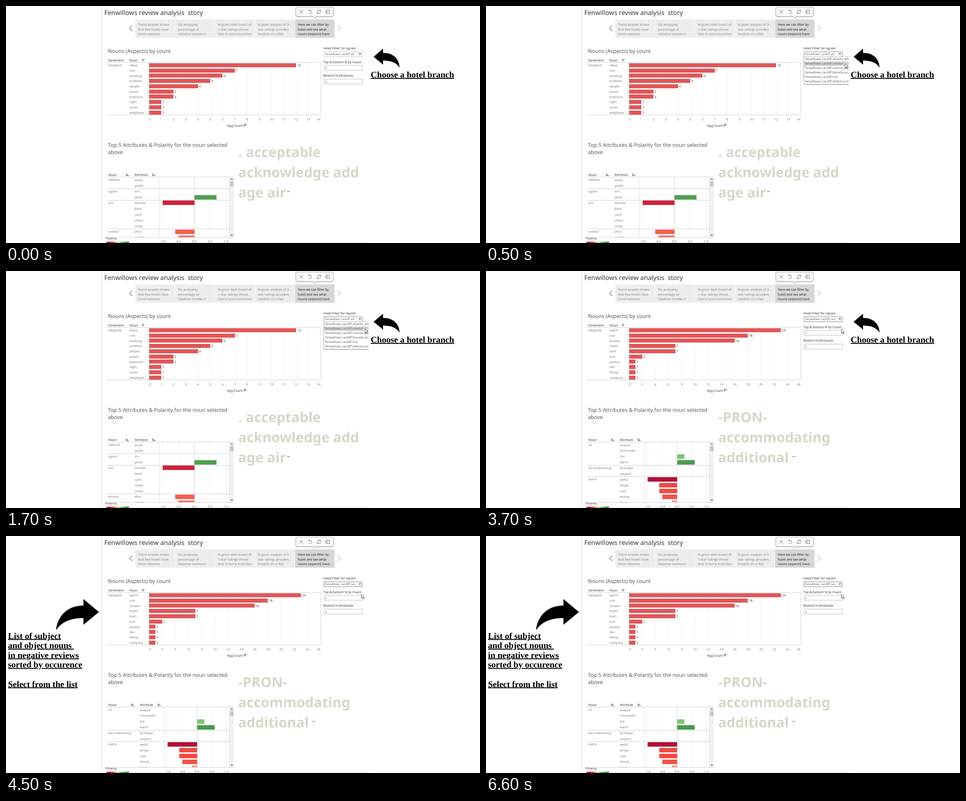
An HTML page that plays this animation: 1056x530 px, repeating every 8 s.

```html
<!DOCTYPE html>
<html lang="en">
<head>
<meta charset="utf-8">
<title>Review story</title>
<style>
html, body { margin: 0; width: 100%; height: 100%; overflow: hidden; background: #fff; }
svg { display: block; }
text { font-family: "Noto Sans", "Open Sans", sans-serif; white-space: pre; text-rendering: geometricPrecision; }
rect, .line { shape-rendering: crispEdges; }
.note { font: bold 19.5px "Liberation Serif", serif; text-decoration: underline; }
</style>
</head>
<body>
<svg id="stage" width="1056" height="530" viewBox="0 0 1056 530"></svg>
<script>
const BRAND = 'Fenwillows', brand = BRAND.toLowerCase();
const GREY = '#7b7b7b', DARK = '#333', RED = '#e15759';

const text = (x, y, s, fill = GREY, size = 7.1, extra = '') =>
  `<text x="${x}" y="${y}" fill="${fill}" font-size="${size}" ${extra}>${s.replace(/&/g, '&amp;')}</text>`;
const rect = (x, y, w, h, fill, stroke = 'none') =>
  `<rect x="${x}" y="${y}" width="${w}" height="${h}" fill="${fill}" stroke="${stroke}"/>`;
const path = (d, stroke, width = 1, fill = 'none') =>
  `<path d="${d}" stroke="${stroke}" stroke-width="${width}" fill="${fill}"/>`;
const line = (d, stroke) => `<path class="line" d="${d}" stroke="${stroke}"/>`;
const hline = (x1, x2, y, c = '#cfcfcf') => line(`M${x1} ${y}H${x2}`, c);
const vline = (x, y1, y2, c = '#f0f0f0') => line(`M${x} ${y1}V${y2}`, c);
const label = (x, y, s) => text(x, y, s, GREY, 7.1, 'text-anchor="middle"');
const sortIcon = (x, y, widths) =>
  widths.map((w, i) => hline(x, x + w, y + 2 * i + .5, '#555')).join('') + vline(x + .5, y, y + 5, '#888');

const counts = [
  { step: 1, max: 14, unit: 27.33, values: [12, 7, 6, 5, 4, 2, 2, 1, 1, 1],
    nouns: 'sleep one booking problem people power bedroom sight route employee' },
  { step: 2, max: 26, unit: 14.72, values: [23, 18, 16, 7, 7, 2, 1, 1, 1, 1],
    nouns: 'alarm one shower towel bath pub worker taxi fitting company' }
];

// rows: attribute, polarity, colour; groups: first row -> noun
const polarity = [
  { col: 341.5, zero: 419.5, unit: 70.7, attrX: 286.5, icons: [267, 326],
    groups: { 0: 'address', 2: 'againi', 4: 'anf', 9: 'animal' },
    rows: [['email'], ['guide'], ['inn'], ['good', .7, '#529f51'], ['terrible', -1, '#d0213b'],
      ['bank'], ['card'], ['check'], ['credit'], ['dirty', -.6, '#f25f4f'], ['wrong', -.5, '#f87664']],
    cloud: ['. acceptable', 'acknowledge add', 'age air'], dots: 627 },
  { col: 353.5, zero: 425.5, unit: 65.3, attrX: 298, icons: [279, 338],
    groups: { 0: 'air', 4: 'airconditioning', 6: 'alarm' },
    rows: [['endure'], ['recirculate'], ['hot', .25, '#7bc772'], ['warm', .6, '#4a9b51'],
      ['drainage'], ['suspect'], ['awful', -1, '#b20f3a'], ['afraid', -.6, '#f04b43'],
      ['cold', -.6, '#f04b43'], ['wrong', -.5, '#f25145'], ['mess', -.18, '#fb9d89']],
    cloud: ['-PRON-', 'accommodating', 'additional'], dots: 683 }
];

const cards = [
  ['Trend anaysis shows', 'that few hotels have', 'mroe negative'],
  ['On analysing', 'percentage of', 'negative reviews it'],
  ['N-gram dash board of', '1-star ratings shows', 'that in some branches'],
  ['N-gram analysis of 2-', 'star ratings provides', 'insights on a few'],
  ['Here we can filter by', 'hotel and see what', 'nouns (aspects) have']
];

function header() {
  let s = vline(212.5, 0, 530, '#dcdcdc') + hline(212, 808, 529.5, '#dcdcdc');
  s += text(219, 19.8, BRAND + ' review analysis  story', '#333', 14.4);
  cards.forEach((lines, i) => {
    const x = 288 + 89 * i, on = i === 4;
    s += rect(x, 30, 88, 41, on ? '#d6d8d5' : '#ebeeeb');
    s += '<g clip-path="url(#cards)">' +
      lines.map((l, j) => text(x + 6, 44 + 10.6 * j, l, on ? '#222' : '#858585', 7.2)).join('') + '</g>';
  });
  s += path('M281.5 44L275 50L281.5 56', '#a6a6a6', 2) + path('M739 44L745.5 50L739 56', '#d4d4d4', 2);
  // toolbar
  s += '<g filter="drop-shadow(0 1px 1px #0004)">' +
    '<path d="M648 2.5H727Q729 2.5 729 4.5V21Q729 23 727 23H692L688 27L684 23H648Q646 23 646 21V4.5Q646 2.5 648 2.5Z" fill="#fff" stroke="#aaa"/></g>';
  s += path('M654 9L662 17M662 9L654 17', '#666');
  s += path('M674.5 10H678A3.5 3.5 0 1 1 674.5 15M676.5 7.5L674 10L676.5 12.5', '#666');
  s += path('M693 12A4 4 0 0 1 700.5 11M701 8.5V11.5H698M701 14A4 4 0 0 1 693.5 15M693 17.5V14.5H696', '#666');
  s += path('M714 11V9H721V17H714V15M711 13H718M713.5 10.5L711 13L713.5 15.5', '#666');
  return s;
}

function countChart({ step, max, unit, values, nouns }) {
  const x0 = 318.5;
  let s = text(227, 104.8, 'Nouns (Aspects) by count', '#555', 11.8);
  s += text(228, 124.3, 'Sentiment', DARK) + text(275, 124.3, 'Noun', DARK) + sortIcon(302.5, 119, [6.5, 4.5, 2.5]);
  for (let n = 0; n <= max; n += step) {
    const x = x0 + n * unit;
    if (n && n < max) s += vline(x, 127, 243);
    s += label(n === 0 ? 321 : n === max ? 696.5 : x, 255.5, '' + n);
  }
  s += hline(224, 702, 126.5) + hline(224, 702, 243.5) + vline(701.5, 126, 244, '#d4d4d4') + vline(318.5, 127, 243, '#d4d4d4');
  s += text(228, 135.2, 'Negative');
  nouns.split(' ').forEach((noun, i) => {
    const y = 132.6 + 11.74 * i, w = values[i] * unit;
    s += text(275, y + 2.6, noun) + rect(x0, y - 4.6, w, 9, RED) + text(x0 + w + 2.3, y + 2.6, '' + values[i], DARK);
  });
  return s + text(492.5, 269.5, 'Agg Count', DARK) + sortIcon(530, 264, [6.5, 4.5, 2.5]);
}

function polarityChart({ col, zero, unit, attrX, icons, groups, rows, cloud, dots }) {
  let s = text(227, 315, 'Top 5 Attributes & Polarity for the noun selected', '#555', 11.8) +
    text(227, 331.3, 'above', '#555', 11.8);
  s += text(228, 379.5, 'Noun', DARK) + text(attrX, 379.5, 'Attribute', DARK);
  icons.forEach(x => s += sortIcon(x, 375, [2.5, 4.5, 6.5]));
  for (let v = -1; v <= 1; v += .5) {
    const x = zero + v * unit;
    s += vline(x, 383, 517, v ? '#f0f0f0' : '#cfcfcf') + label(x, 528.5, v.toFixed(1));
  }
  s += vline(col, 383, 517, '#dcdcdc') + '<g clip-path="url(#table)">';
  rows.forEach(([name, v, fill], i) => {
    const y = 389 + 12.87 * i;
    if (groups[i]) s += text(228, y + 2.2, groups[i]) + (i ? hline(224, 497, Math.floor(y - 6.4) + .5) : '');
    s += text(attrX, y + 2.6, name);
    if (v) s += rect(zero + Math.min(v, 0) * unit, y - 5, Math.abs(v) * unit, 10, fill);
  });
  s += '</g>' + hline(224, 508, 382.5) + hline(224, 508, 517.5);
  // scrollbar
  s += rect(497.5, 383, 10.5, 134, '#f1f1f1') + rect(498.5, 391.5, 8.5, 11, '#c9c9c9') + vline(497.5, 383, 517, '#dcdcdc');
  s += path('M500.8 388.3L503 386L505.2 388.3M500.8 511L503 513.3L505.2 511', '#444', 1.2);
  // legend
  s += rect(219, 514, 29, 14, '#fff') + text(221.5, 522, 'Polarity', DARK) + rect(224, 527, 50, 3, 'url(#scale)');
  cloud.forEach((l, i) => s += text(517.5, 337.8 + 45.1 * i, l, '#d7d6c7', 30.8, 'font-weight="bold"'));
  for (let i = 0; i < 3; i++) s += rect(dots + 2 * i, 414, 1, 2, '#444');
  return s;
}

function filters(choice, active) {
  const box = y => rect(708.5, y, 85.5, 11, '#fff', '#bcbcbc') + text(711, y + 8, '5');
  return text(707, 97.3, 'Hotel Filter for ngram', DARK) +
    rect(708.5, 102.5, 85, 11, '#fff', active ? '#888' : '#c4c4c4') +
    text(711, 110, `${brand} cardiff ${choice}...`, '#666', 6.7) +
    path('M786 106H791L788.5 109Z', 'none', 0, '#333') + vline(783.5, 104, 112, '#e8e8e8') +
    text(707, 127.5, 'Top & bottom N by Count ..', DARK) + box(132.5) +
    text(707, 158.2, 'Bottom N attributes', DARK) + box(163.5);
}

function menu() {
  const items = ['atlantic wharf', 'central', 'central queen street', 'llanederyn', 'm4', 'whitchurch'];
  return '<g clip-path="url(#panel)"><g filter="drop-shadow(0 1px 1px #0005)">' +
    rect(708.5, 113.5, 110, 60.5, '#fff', '#bbb') + '</g>' + rect(709, 123.8, 100, 9.8, '#d4d4d4') +
    items.map((n, i) => text(711, 121.3 + 9.95 * i, `${brand} cardiff ${n}`, '#666', 7.2)).join('') + '</g>';
}

const cursor = (x, y) =>
  path(`M${x} ${y}v9.2l2.1-2 1.6 3.5 1.5-.7-1.6-3.4h2.8z`, '#333', .8, '#fff');

const note = (x, y, s) => `<text class="note" x="${x}" y="${y}">${s}</text>`;
const branchNote = () => note(812.5, 160, 'Choose a hotel branch') +
  path('M819 113.5L840 95.5V105C862 104.5 876 117.5 877 138C870 126.5 858 122 840 122V131Z', 'none', 0, '#000');
const listNote = () =>
  ['List of subject', 'and object nouns ', 'in negative reviews', 'sorted by occurence', '', 'Select from the list']
    .map((l, i) => l && note(4.5, 229.5 + 21.6 * i, l)).join('') +
  path('M207 170L172.5 141V155.5C134 155.5 114 182 111.5 211C124 191 146 183.5 172.5 183.5V198.5Z', 'none', 0, '#000');

const defs = `<defs>
  <clipPath id="cards"><rect x="288" y="30" width="444" height="36"/></clipPath>
  <clipPath id="table"><rect x="224" y="383" width="273" height="134"/></clipPath>
  <clipPath id="panel"><rect x="700" y="100" width="108" height="90"/></clipPath>
  <linearGradient id="scale"><stop stop-color="#b10d3a"/><stop offset=".3" stop-color="#f0483e"/>
    <stop offset=".5" stop-color="#e8d8c0"/><stop offset=".7" stop-color="#6fbf68"/><stop offset="1" stop-color="#2b8040"/></linearGradient>
</defs>`;

function scene(step) {
  const data = step < 2 ? 0 : 1;
  return defs + header() + countChart(counts[data]) + polarityChart(polarity[data]) +
    filters(data ? 'cen' : 'atl', step > 0) +
    (step === 1 ? menu() + cursor(800, 129) : '') + (data ? cursor(792, 130) : '') +
    (step < 3 ? branchNote() : listNote());
}

const starts = [0, 500, 2500, 4500], stage = document.getElementById('stage');
let shown = -1;
function play() {
  const t = performance.now() % 8000;
  const step = starts.filter(s => s <= t).length - 1;
  if (step !== shown) stage.innerHTML = scene(shown = step);
  requestAnimationFrame(play);
}
play();
</script>
</body>
</html>
```
